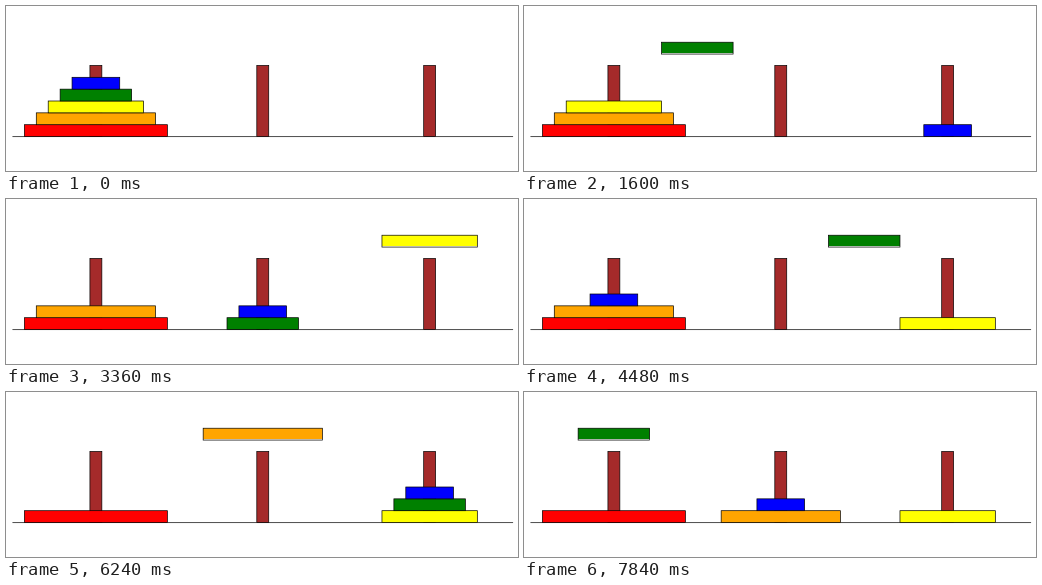
Animation of 512x165 px, one loop 8000 ms. Source, as an HTML page with a canvas:

```html
<!DOCTYPE html>
<html lang="en">
<head>
<meta charset="utf-8">
<title>Tower of Hanoi</title>
<style>
  html, body { margin: 0; width: 100%; height: 100%; overflow: hidden; background: #fff; }
  canvas { display: block; }
</style>
</head>
<body>
<canvas id="stage" width="512" height="165"></canvas>
<script>
const ctx = document.getElementById("stage").getContext("2d");
const LOOP = 8000, HOLD = 480, STEP = 160;
const LIFTED = 6.96;                    // level of a carried disc
const PEGS = [7, 21, 35];               // peg centres in grid units
const COLORS = ["blue", "green", "yellow", "orange", "red"];
// Each move: disc, from peg, to peg
const MOVES = [
  [0, 0, 2], [1, 0, 1], [0, 2, 1], [2, 0, 2], [0, 1, 0],
  [1, 1, 2], [0, 0, 2], [3, 0, 1], [0, 2, 1], [1, 2, 0]
];

const gridX = u => 6.45 + 11.92 * u;
const gridY = level => 130.55 - 11.85 * level;

function box(center, halfWidth, bottom, height, color) {
  const left = gridX(center - halfWidth), width = gridX(center + halfWidth) - left;
  const top = gridY(bottom + height), tall = gridY(bottom) - top;
  const seam = bottom === LIFTED ? 1 : 0;   // light gap under a carried disc
  ctx.fillStyle = color;
  ctx.fillRect(left, top, width, tall - seam);
  ctx.strokeRect(left, top, width, tall);
}

// Discs on each peg, plus the carried disc, after a number of steps.
// A move visits every half-way point above the pegs, then drops.
function stateAt(step) {
  const stacks = [[4, 3, 2, 1, 0], [], []];
  for (const [disc, from, to] of MOVES) {
    if (step <= 0) break;
    stacks[from].pop();
    const hops = 2 * Math.abs(to - from);
    if (step <= hops + 1) {
      const progress = (step - 1) / hops;
      const center = PEGS[from] + (PEGS[to] - PEGS[from]) * progress;
      return { stacks, carried: { disc, center } };
    }
    stacks[to].push(disc);
    step -= hops + 2;
  }
  return { stacks };
}

function drawDisc(disc, center, level) {
  box(center, disc + 2, level, 1, COLORS[disc]);
}

function draw(time) {
  const step = time < HOLD ? 0 : Math.floor((time - HOLD) / STEP) + 1;
  const { stacks, carried } = stateAt(step);
  ctx.fillStyle = "white";
  ctx.fillRect(0, 0, 512, 165);
  ctx.strokeStyle = "black";
  ctx.lineWidth = 0.7;
  ctx.beginPath();
  ctx.moveTo(gridX(0), gridY(0));
  ctx.lineTo(gridX(42), gridY(0));
  ctx.stroke();
  PEGS.forEach((center, i) => {
    box(center, 0.5, 0, 6, "brown");
    stacks[i].forEach((disc, level) => drawDisc(disc, center, level));
  });
  if (carried) drawDisc(carried.disc, carried.center, LIFTED);
}

const start = performance.now();
function tick() {
  draw((performance.now() - start) % LOOP);
  requestAnimationFrame(tick);
}
tick();
</script>
</body>
</html>
```
